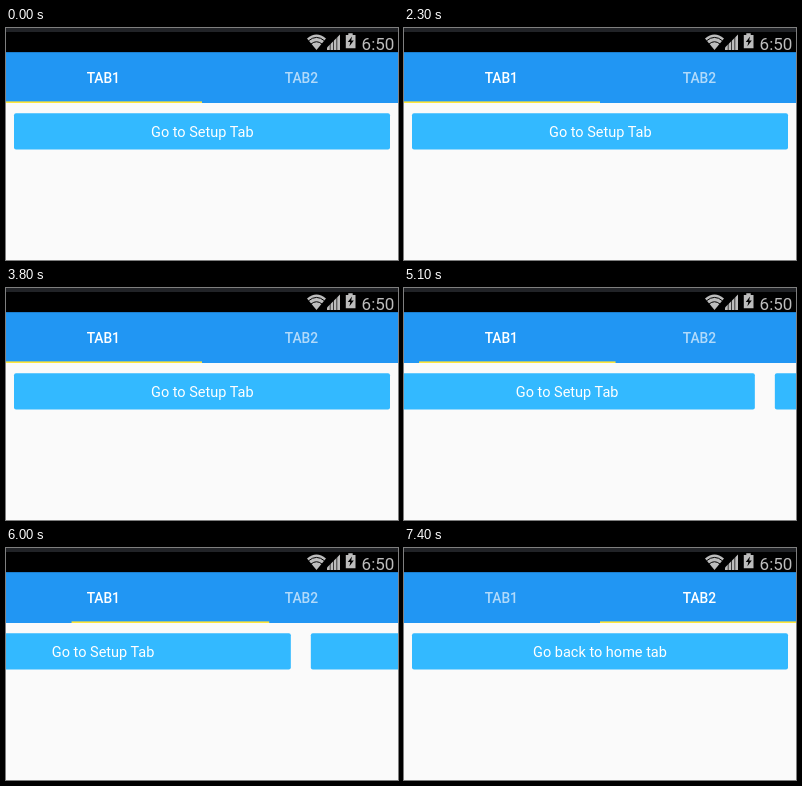
These frames come from a looping animation (392x232 px, 8 s). An HTML page:

```html
<!DOCTYPE html>
<html lang="en">
<head>
<meta charset="utf-8">
<title>Tabs</title>
<style>
  html, body { margin: 0; width: 100%; height: 100%; overflow: hidden; background: #fafafa; }
  svg { display: block; width: 392px; height: 232px; }
  text { font-family: Roboto, "Noto Sans", sans-serif; font-size: 14.5px; fill: #fff; text-anchor: middle; }
  .tab { font-size: 13.8px; font-weight: 500; }
  .clock { font-size: 17px; fill: #bdbdbd; }
</style>
</head>
<body>
<svg viewBox="0 0 392 232">
  <rect width="392" height="232" fill="#fafafa"/>
  <rect width="392" height="24" fill="#000"/>
  <rect width="392" height="4" fill="#212327"/>

  <!-- Wi-Fi, signal, battery -->
  <g fill="#bdbdbd">
    <path d="M310.500 22L301 10.500Q310.500 2.500 320 10.500Z"/>
    <path d="M321 22V19.500L334 6.500V22Z"/>
    <path d="M342.300 5.300H346.700V7H349.500V20.300H339.800V7H342.300Z"/>
  </g>
  <g fill="none" stroke="#000">
    <path d="M302.500 12.800Q310.500 6 318.500 12.800M305 16Q310.500 11.500 316 16"/>
    <path d="M324.200 6V22M327.500 6V22M330.800 6V22" stroke-width=".7"/>
  </g>
  <path d="M346 8.500L341.800 14H344.300L343.400 18.300L347.800 12.500H345.200Z" fill="#000"/>
  <text class="clock" x="372" y="22">6:50</text>

  <rect y="24" width="392" height="51" fill="#2196f3"/>
  <rect y="24" width="392" height="1" fill="#1b7fd0"/>
  <text class="tab" id="tab1" x="97.300" y="55">TAB1</text>
  <text class="tab" id="tab2" x="295.500" y="55">TAB2</text>
  <rect id="bar" y="73.400" height="1.600" fill="#ffe63b"/>

  <g id="page1">
    <rect x="8" y="85.200" width="376" height="36.400" rx="2" fill="#33b9ff"/>
    <text x="196.300" y="109">Go to Setup Tab</text>
  </g>
  <g id="page2">
    <rect x="8" y="85.200" width="376" height="36.400" rx="2" fill="#33b9ff"/>
    <text x="196" y="109">Go back to home tab</text>
  </g>
</svg>
<script>
const LOOP = 8000, STEP = 100, STRIDE = 396, HALF = 196;
const FLING = 0.695, DRAG = 1.62;
const $ = id => document.getElementById(id);
const [tab1, tab2, bar, page1, page2] = ['tab1', 'tab2', 'bar', 'page1', 'page2'].map($);

// Each move flips between the two tabs
const moves = [
  { at: 1100, steps: 4, bias: FLING },
  { at: 1900, steps: 5, bias: FLING },
  { at: 2700, steps: 2, bias: FLING, press: 200 },
  { at: 3700, steps: 2, bias: FLING, press: 300 },
  { at: 4800, steps: 9, bias: DRAG },
  { at: 5700, steps: 8, bias: FLING },
  { at: 7000, steps: 5, bias: FLING }
];

const smooth = u => u * u * (3 - 2 * u);

// 0 = first tab, 1 = second tab
function position(t) {
  return moves.reduce((p, { at, steps, bias }) => {
    if (t < at) return p;
    const u = Math.min(((t - at) / STEP + 1) / steps, 1);
    const e = smooth(smooth(u ** bias));
    return p + (1 - 2 * p) * e;
  }, 0);
}

function draw(time) {
  const t = Math.floor((time % LOOP) / STEP) * STEP;
  const p = position(t);
  const settled = p === 0 || p === 1;
  // The underline trails the page, more so at speed
  const delta = settled ? 0 : p - position(t - STEP);
  const q = p - delta * Math.min(0.36, 1.5 * Math.abs(delta));
  const pressed = moves.some(m => m.press && t >= m.at - m.press && t < m.at);

  page1.setAttribute('transform', `translate(${-p * STRIDE} 0)`);
  page2.setAttribute('transform', `translate(${(1 - p) * STRIDE} 0)`);
  for (const page of [page1, page2]) page.setAttribute('opacity', pressed ? 0.5 : 1);
  bar.setAttribute('x', q * HALF);
  bar.setAttribute('width', HALF + 2 * Math.sin(Math.PI * q));
  tab1.setAttribute('opacity', p < 0.5 ? 1 : 0.65);
  tab2.setAttribute('opacity', p < 0.5 ? 0.65 : 1);
}

const begin = performance.now();
function tick() {
  draw(performance.now() - begin);
  requestAnimationFrame(tick);
}
tick();
</script>
</body>
</html>
```
